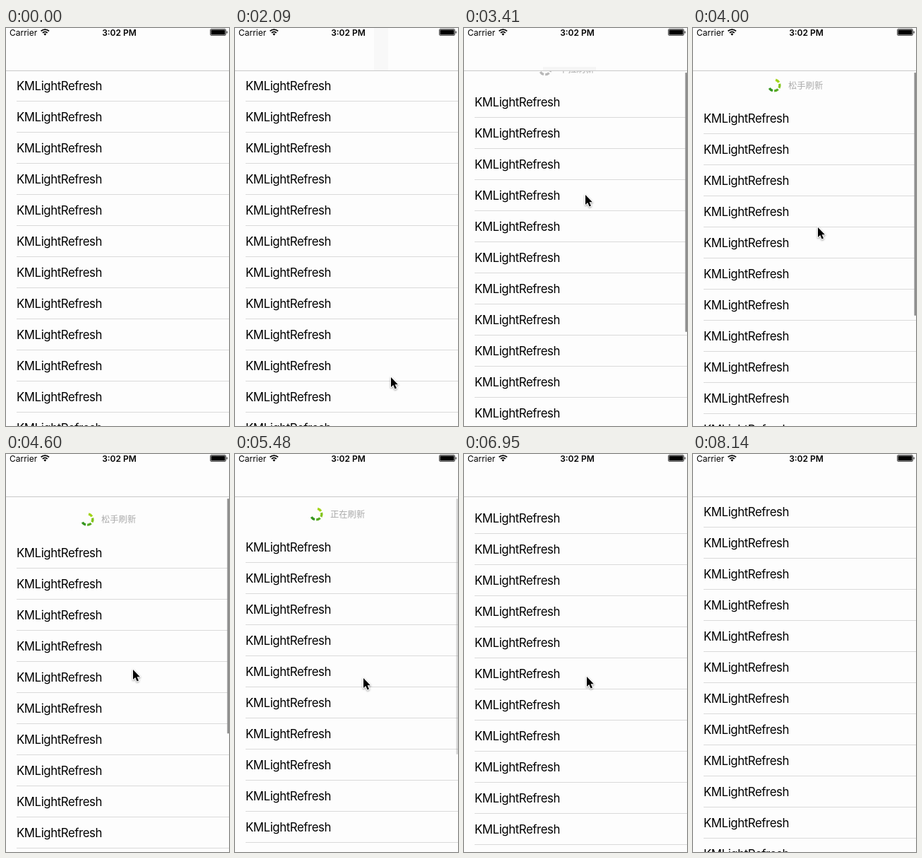
Write an HTML page with a canvas that moves like this. It is 316 px wide and 563 px high and loops after 8.48 s.

```html
<!DOCTYPE html>
<html lang="en">
<head>
<meta charset="utf-8">
<title>Pull to refresh</title>
<style>
  html, body { margin: 0; width: 100%; height: 100%; overflow: hidden; background: #fdfdfd; }
  canvas { display: block; }
</style>
</head>
<body>
<canvas id="stage" width="316" height="563"></canvas>
<script>
const ctx = document.getElementById('stage').getContext('2d');
const W = 316, H = 563, LOOP = 8480, TICK = 147.7;
const BG = '#fdfdfd', NAV = 60, ROW = 44;
const UI = 'Inter, sans-serif', CJK = '"Noto Sans CJK SC", "Noto Sans CJK", sans-serif';

// Key points are [tick, value...]
const CURSOR = [
  [2, 252, 532], [4, 233, 508], [6, 221, 492], [13, 221, 492], [14, 221, 494],
  [15, 213, 435], [16, 190, 325], [17, 164, 225], [18, 155, 181], [19, 155, 181],
  [20, 158, 193], [23, 172, 236], [27, 177, 282], [31, 180, 305], [35, 182, 317],
  [40, 182, 317], [43, 174, 315], [51, 174, 315], [52, 189, 343], [53, 234, 428],
  [54, 291, 530], [55, 330, 590]
];
const SETTLE = [
  [35, 63.5], [36, 57], [37, 50], [38, 46], [39, 44], [44, 44],
  [45, 36], [46, 22], [47, 9], [48, 2], [49, 0]
];
const BAR_FADE = [[35, 1], [36, .72], [37, .36], [38, .12], [39, 0]];

function keyed(points, tick) {
  if (tick <= points[0][0]) return points[0].slice(1);
  for (let i = 1; i < points.length; i++) {
    const a = points[i - 1], b = points[i];
    if (tick <= b[0]) {
      const u = (tick - a[0]) / (b[0] - a[0]);
      return a.slice(1).map((v, j) => v + (b[j + 1] - v) * u);
    }
  }
  return points[points.length - 1].slice(1);
}

// Dragging moves the list by half the pointer's travel
function pullAt(tick) {
  if (tick < 20) return 0;
  if (tick <= 35) return Math.max(0, (keyed(CURSOR, tick)[1] - 190) / 2);
  return keyed(SETTLE, tick)[0];
}

function rect(color, x, y, w, h) {
  ctx.fillStyle = color;
  ctx.fillRect(x, y, w, h);
}

function text(str, x, y, font, color = '#000', spacing = 0, align = 'left') {
  ctx.font = font;
  ctx.fillStyle = color;
  ctx.letterSpacing = spacing + 'px';
  ctx.textAlign = align;
  ctx.fillText(str, x, y);
}

function arc(x, y, r, from, to, width, color) {
  ctx.beginPath();
  ctx.arc(x, y, r, from, to);
  ctx.lineWidth = width;
  ctx.strokeStyle = color;
  ctx.stroke();
}

function drawRing(y, active, turn) {
  const step = Math.PI / 3, gap = .14;
  const greens = ['#a2d416', '#84c51c', '#55aa20', '#34951f'];
  for (let i = 0; i < (active ? 4 : 6); i++) {
    const start = -1.45 + turn + i * step;
    arc(115, y, 7.9, start + gap, start + step - gap, 3.4, active ? greens[i] : '#b8b8b8');
  }
}

function drawHeader(tick, pull) {
  const refreshing = tick >= 36 && tick < 44;
  const ready = tick < 36 && pull > 44;
  const y = 35 + pull;
  const turn = refreshing ? (tick - 37) * TICK / 880 * 2 * Math.PI : 0;
  drawRing(y, refreshing || ready, turn);
  const label = refreshing ? '正在刷新' : ready ? '松手刷新' : '下拉刷新';
  text(label, 135, y + 4.5, '12.3px ' + CJK, '#aaa');
}

function drawRows(pull) {
  const top = Math.round(pull);
  for (let i = 0; i < 12; i++) {
    const y = top + i * ROW;
    text('KMLightRefresh', 15, y + 88, '16.8px ' + UI, '#000', -.42);
    rect('#dadada', 15, y + 103, W - 15, 1);
  }
}

function drawScrollBar(tick, pull) {
  if (tick < 20 || tick >= 39) return;
  const bottom = tick <= 35 ? 453 - pull : 475 - pull;
  ctx.globalAlpha = keyed(BAR_FADE, tick)[0];
  ctx.beginPath();
  ctx.roundRect(313.5, 63, 2.5, bottom - 63, 1.2);
  ctx.fillStyle = '#8f8f8f';
  ctx.fill();
  ctx.globalAlpha = 1;
}

function drawStatusBar() {
  text('Carrier', 5, 10.5, '12px ' + UI);
  text('3:02 PM', 160.5, 10.5, '600 12px ' + UI, '#000', 0, 'center');
  const up = -Math.PI / 2;
  for (const r of [4.9, 8.3]) arc(55.3, 10.4, r, up - .76, up + .76, 1.8, '#000');
  ctx.beginPath();
  ctx.moveTo(55.3, 10.7);
  ctx.arc(55.3, 10.4, 2.7, up - .76, up + .76);
  ctx.fillStyle = '#000';
  ctx.fill();

  ctx.beginPath();
  ctx.roundRect(289.5, 1.5, 22, 9, 1.5);
  ctx.lineWidth = 1;
  ctx.strokeStyle = '#555';
  ctx.stroke();
  rect('#000', 290.5, 2.5, 20, 7);
  rect('#333', 312.5, 4.5, 1.3, 3);
}

function drawNav(tick, pull) {
  rect(BG, 0, 0, W, NAV);
  if (tick >= 4 && tick < 20) rect('#f8f8f8', 197, 0, 20, NAV);
  // Pulled header faintly showing through the bar
  if (pull > 15 && pull < 32) rect('#f5f5f5', 112, 55, 75, 5);
  rect('#cacaca', 0, NAV, W, 1);
  drawStatusBar();
}

function drawCursor(tick) {
  if (tick < 2 || tick >= 55) return;
  const [x, y] = keyed(CURSOR, tick);
  ctx.save();
  ctx.translate(x, y);
  ctx.beginPath();
  [[0, 0], [0, 14], [3.2, 11.1], [5.6, 16.6], [8, 15.5], [5.6, 10.2], [9.9, 10.2]]
    .forEach(p => ctx.lineTo(...p));
  ctx.closePath();
  ctx.shadowColor = 'rgba(0,0,0,.4)';
  ctx.shadowBlur = 2.5;
  ctx.shadowOffsetY = 1;
  ctx.lineWidth = 2;
  ctx.lineJoin = 'round';
  ctx.strokeStyle = '#fff';
  ctx.stroke();
  ctx.shadowColor = 'transparent';
  ctx.fillStyle = '#000';
  ctx.fill();
  ctx.restore();
}

function draw(now) {
  const tick = Math.floor((now % LOOP) / TICK);
  const pull = pullAt(tick);
  rect(BG, 0, 0, W, H);
  if (pull > 0) drawHeader(tick, pull);
  drawRows(pull);
  drawNav(tick, pull);
  drawScrollBar(tick, pull);
  drawCursor(tick);
}

const began = performance.now();
function loop() {
  draw(performance.now() - began);
  requestAnimationFrame(loop);
}
loop();
</script>
</body>
</html>
```
